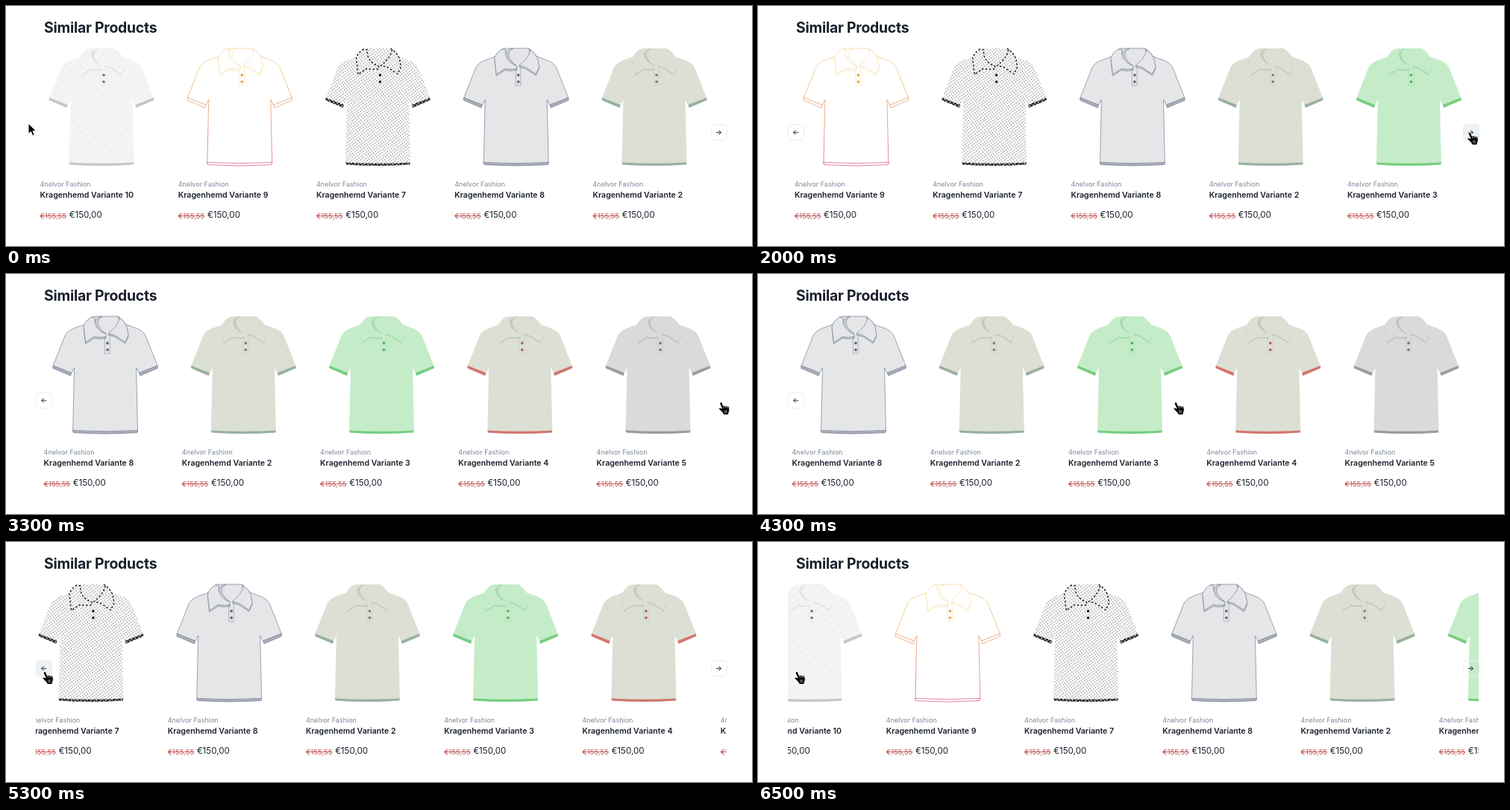
An HTML page for the animation above (6600 ms loop, 1000 by 323 pixels).

```html
<!DOCTYPE html>
<html lang="en">
<head>
<meta charset="utf-8">
<title>Similar Products</title>
<style>
  html, body { margin: 0; width: 100%; height: 100%; overflow: hidden; background: #fff; }
  svg { display: block; width: 1000px; height: 323px; font-family: Inter, Roboto, sans-serif; }
  .title { font-size: 19.4px; font-weight: 700; letter-spacing: -.25px; fill: #1a202c; }
  .brand { font-size: 9px; fill: #7c869a; }
  .name { font-size: 10.6px; font-weight: 600; fill: #1a202c; }
  .old { font-size: 9.6px; fill: #c25a5a; }
  .price { font-size: 11.6px; fill: #1a202c; }
  .btn rect { fill: none; stroke: #e9edf2; }
  .btn.hover rect { fill: #edf2f7; }
  .btn path { fill: none; stroke: #1a202c; stroke-width: 1; stroke-linecap: round; stroke-linejoin: round; }
</style>
</head>
<body>
<svg viewBox="0 0 1000 323">
  <defs>
    <clipPath id="view"><rect x="40" y="45" width="926" height="260"/></clipPath>
    <linearGradient id="sunset" gradientUnits="userSpaceOnUse" x1="0" y1="57" x2="0" y2="215">
      <stop offset="0" stop-color="#f4d48c"/>
      <stop offset=".4" stop-color="#e9a46a"/>
      <stop offset="1" stop-color="#dc5877"/>
    </linearGradient>
    <pattern id="dots" width="4.6" height="4.6" patternUnits="userSpaceOnUse" patternTransform="rotate(8)">
      <rect width="4.6" height="4.6" fill="#fff"/>
      <circle cx="1.15" cy="1.15" r=".6" fill="#444"/>
      <circle cx="3.45" cy="3.45" r=".6" fill="#444"/>
    </pattern>
    <pattern id="checks" width="5" height="5" patternUnits="userSpaceOnUse" patternTransform="rotate(12)">
      <rect width="5" height="5" fill="#151515"/>
      <path d="M.5 .5H2.5V2.5H.5ZM3 3H4.8V4.8H3Z" fill="#eee"/>
    </pattern>
    <pattern id="weave" width="12" height="12" patternUnits="userSpaceOnUse" patternTransform="rotate(10)">
      <rect width="12" height="12" fill="#f5f5f5"/>
      <path d="M0 0H6V6H12V12H6V6H0Z" fill="#f2f2f2"/>
    </pattern>
  </defs>
  <text class="title" x="51" y="36">Similar Products</text>
  <g clip-path="url(#view)"><g id="track"></g></g>
  <g id="prev" class="btn">
    <rect x="40.5" y="159.5" width="21" height="21" rx="4"/>
    <path d="M53.6 170.2H47.8M50.2 167.6L47.6 170.2L50.2 172.8"/>
  </g>
  <g id="next" class="btn">
    <rect x="945.5" y="159.5" width="21" height="21" rx="4"/>
    <path d="M952.4 170.2H958.2M955.8 167.6L958.4 170.2L955.8 172.8"/>
  </g>
  <g id="arrow" stroke="#fff" stroke-linejoin="round">
    <path d="M.5 .5V14.8L3.8 11.6L6.2 17L8.7 15.9L6.4 10.7H10.8Z" fill="#000"/>
  </g>
  <g id="hand" stroke="#fff" stroke-linecap="round" stroke-linejoin="round">
    <path stroke-width=".9" d="M3.2 1C2 1.5 2 2.8 2.6 4L4.9 9C3.5 8 1.5 7.5 1 8.8C.7 9.8 2 10.5 3 11.5L6 14.8L7 17H13L13.5 14.5C14.8 12 14.6 9 13.8 7C13 5.5 11.8 5.8 11.5 6.6C11 5.2 9.5 5 9 6C8.4 5 7.2 4.8 6.7 5.5L5 1.6C4.6 .7 3.8 .6 3.2 1Z"/>
    <path stroke-width=".6" fill="none" d="M6.7 5.6L7.9 8.4M9.1 6.2L10 8.2M11.5 6.8L12.1 8.3M8.2 11.5L9 14.5M10.2 11.2L10.7 14.3"/>
  </g>
</svg>
<script>
const $ = id => document.getElementById(id);
const LOOP = 6600, STEP = 185.25, LEFT = 45.5, GLIDE = 300;

// line: outer contour, seam: collar contour, dash: broken collar contour
const styles = [
  { no: 10, fill: 'url(#weave)', shade: '#e2e2e2', trim: '#c6c6c6', button: '#6e6e6e' },
  { no: 9, fill: '#fff', shade: '#fff', trim: '#fff', button: '#e9a23f', line: 'url(#sunset)', seam: '#f8e2b4' },
  { no: 7, fill: 'url(#dots)', shade: 'url(#dots)', trim: 'url(#checks)', button: '#151515', seam: '#222', dash: '2.5 2.5' },
  { no: 8, fill: '#e5e6e8', shade: '#cfd1d8', trim: '#a9adb9', button: '#555b70', line: '#80859a', seam: '#80859a' },
  { no: 2, fill: '#dcdfd3', shade: '#c6c9be', trim: '#98b09f', button: '#767a74' },
  { no: 3, fill: '#c5ecc9', shade: '#a9dcae', trim: '#76ce80', button: '#45b356' },
  { no: 4, fill: '#dcdfd3', shade: '#c6c9be', trim: '#d2766f', button: '#b5564f' },
  { no: 5, fill: '#dadada', shade: '#c3c3c3', trim: '#9b9b9b', button: '#6f6f6f' },
];

// Shirt outlines, with x = 0 on the centre line
const body = 'M-19 58Q-13 56.6 -8 57H17Q25 63 28 68L43 73.5Q51 77 54 83L70 123.5L45.5 133.5L41.5 126L43.5 212Q0 215 -43.5 212L-41.5 126L-45.5 133.5L-70 123.5L-54 83Q-51 77 -43 73.5L-28 68Z';
const cuff = 'M-70 123.3L-45.3 133L-46.6 137L-70.4 126.8Z';
const hem = 'M-43.5 210.4Q0 213.2 43.5 210.4L42.8 213.6Q0 216.6 -42.8 213.6Z';
const wings = 'M-19 58Q-27 63 -29 70L-26.5 92L-15 84.5Q-7 86 1 84.5V81Q-16 74 -14 59Z' +
  'M17 57Q26 63 29 71L31 82L26.5 91.5L13 82.5L4 80Q16 71 19 60Z';
const inner = 'M-7 57.4Q-18 63 -13.5 71Q-8 78 1 80.5Q-8 74 -10 67Q-11 61 -4 57.4Z';

function shirt({ fill, shade, trim, button, line, seam, dash }) {
  const part = (d, paint, stroke = 'none', extra = '') =>
    `<path d="${d}" fill="${paint}" stroke="${stroke}" stroke-width=".75" ${extra}/>`;
  const stud = y => `<circle cx="3" cy="${y}" r="1.8" fill="${button}"/>`;
  const stitch = dash ? `stroke-dasharray="${dash}" style="stroke-width:1.5"` : '';
  return part(body, fill, line) + part(cuff, trim, line) +
    part(cuff, trim, line, 'transform="scale(-1 1)"') + part(hem, trim, line) +
    part(inner, shade, dash ? 'none' : seam) + part(wings, shade, dash ? 'none' : seam, 'transform="translate(0 2)"') +
    part(wings, fill, seam, stitch) +
    part('M-.5 84V107H6.2V82', 'none', dash ? 'none' : seam || shade, 'stroke-opacity=".7"') +
    stud(93) + stud(102);
}

$('track').innerHTML = styles.map((s, i) => `
  <g transform="translate(${LEFT + i * STEP} 0)">
    <g transform="translate(82.5 0)">${shirt(s)}</g>
    <text class="brand" x="0" y="243.2">4nelvor Fashion</text>
    <text class="name" x="0" y="257.8">Kragenhemd Variante ${s.no}</text>
    <text class="old" x="0" y="285.6" text-decoration="line-through">€155,55</text>
    <text class="price" x="39.2" y="284.6">€150,00</text>
  </g>`).join('');

// [time, direction] of each press on a button
const clicks = [[1750, 1], [2380, 1], [3057, 1], [5080, -1], [5705, -1], [6329, -1]];

// [time, x, y] of the pointer's top left corner
const route = [
  [0, 29.5, 157.5], [400, 29.5, 157.5], [700, 55, 150], [900, 130, 140], [1100, 273, 136], [1200, 430, 133],
  [1300, 640, 140], [1400, 840, 158], [1500, 940, 167], [1600, 950, 169], [2900, 950, 169],
  [3100, 954.5, 171.5], [4000, 954.5, 171.5], [4100, 935, 171.5], [4200, 770, 171.5], [4300, 556, 171.5],
  [4400, 390, 171.5], [4500, 265, 172], [4600, 178, 172], [4700, 121, 172], [4800, 80, 172],
  [4900, 57, 173], [5000, 48, 173.5], [LOOP, 48, 173.5],
];

const ease = u => u < .5 ? 4 * u ** 3 : 1 - 4 * (1 - u) ** 3;

function pointer(t) {
  const i = route.findIndex(p => p[0] > t);
  const [t0, x0, y0] = route[i - 1], [t1, x1, y1] = route[i];
  const u = (t - t0) / (t1 - t0);
  return [x0 + (x1 - x0) * u, y0 + (y1 - y0) * u];
}

function draw(t) {
  let pos = 0, goal = 0;
  for (const [start, dir] of clicks) {
    if (t < start) break;
    goal += dir;
    pos += dir * ease(Math.min(1, (t - start) / GLIDE));
  }
  $('track').setAttribute('transform', `translate(${-pos * STEP} 0)`);

  const [x, y] = pointer(t);
  const onCard = x > 40;
  $('arrow').setAttribute('transform', `translate(${x} ${y})`);
  $('hand').setAttribute('transform', `translate(${x} ${y}) scale(1.06)`);
  $('arrow').style.display = onCard ? 'none' : '';
  $('hand').style.display = onCard ? '' : 'none';

  $('prev').style.display = goal > 0 ? '' : 'none';
  $('next').style.display = goal < 3 ? '' : 'none';
  $('prev').classList.toggle('hover', onCard && x < 59);
  $('next').classList.toggle('hover', x > 938);
}

// The picture advances ten times a second
const begin = performance.now();
function tick() {
  const t = (performance.now() - begin) % LOOP;
  draw(Math.floor(t / 100) * 100);
  requestAnimationFrame(tick);
}
tick();
</script>
</body>
</html>
```
